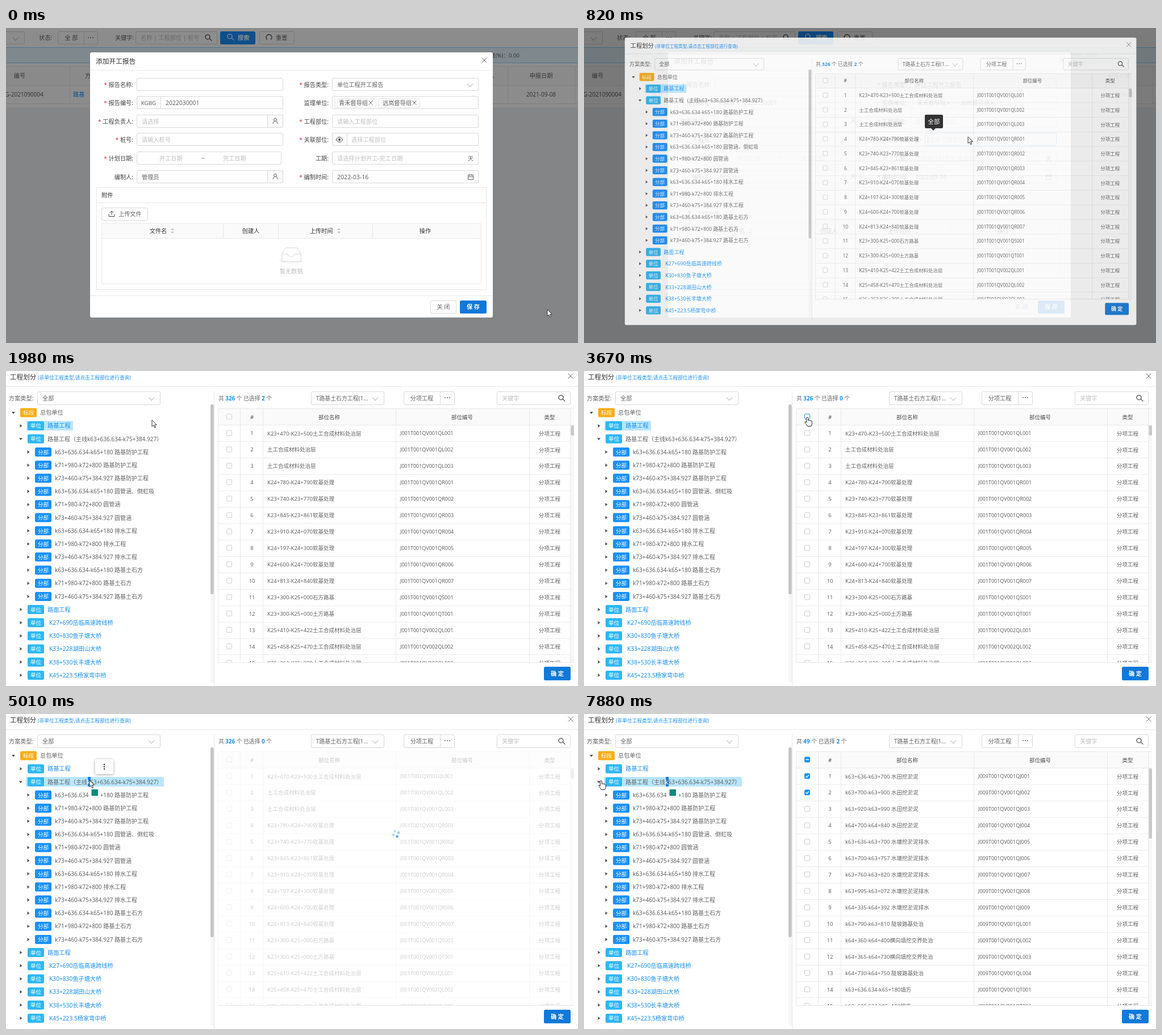
An HTML page that plays this animation: 1007 by 556 pixels, repeating every 8000 ms.

```html
<!DOCTYPE html>
<html lang="zh-CN">
<head>
<meta charset="utf-8">
<title>开工报告</title>
<style>
html, body { margin: 0; width: 100%; height: 100%; overflow: hidden; background: #fff; }
svg { display: block; width: 100vw; height: 100vh; font-family: "Noto Sans", "Noto Sans CJK SC", "Noto Sans CJK", sans-serif; }
text { white-space: pre; }
</style>
</head>
<body>
<svg id="stage" viewBox="0 0 1007 556"></svg>
<script>
const LOOP = 8000, TICK = 168, LEAD = 36;
const BLUE = '#1079d9', LINK = '#1890ff', INK = '#636363', HINT = '#bfbfbf', EDGE = '#d9d9d9', RULE = '#e8e8e8';
const stage = document.getElementById('stage');

// ---- drawing helpers: y of a text is its vertical middle ----
const text = (x, y, s, fill = INK, size = 10.2, anchor = 'start', weight = 400) =>
  `<text x="${x}" y="${y + size * .37}" fill="${fill}" font-size="${size}" text-anchor="${anchor}" font-weight="${weight}">${s}</text>`;
const mid = (x, y, s, fill, size, weight) => text(x, y, s, fill, size, 'middle', weight);
const rect = (x1, y1, x2, y2, fill = '#fff', stroke = 'none', r = 0) => {
  const o = stroke === 'none' ? 0 : .5;
  return `<rect x="${x1 + o}" y="${y1 + o}" width="${x2 - x1 - 2 * o}" height="${y2 - y1 - 2 * o}" rx="${r}" fill="${fill}" stroke="${stroke}"/>`;
};
const box = (x1, y1, x2, y2, fill) => rect(x1, y1, x2, y2, fill, EDGE, 2.5);
const path = (d, stroke = '#666', w = 1, fill = 'none') =>
  `<path d="${d}" fill="${fill}" stroke="${stroke}" stroke-width="${w}"/>`;
const hline = (x1, x2, y, c = RULE) => path(`M${x1} ${y + .5}H${x2}`, c);
const vline = (x, y1, y2, c = RULE) => path(`M${x + .5} ${y1}V${y2}`, c);
const dot = (x, y, r, fill, o = 1) => `<circle cx="${x}" cy="${y}" r="${r}" fill="${fill}" opacity="${o}"/>`;
const dots = (x, y) => [-4, 0, 4].map(d => dot(x + d, y, .9, INK)).join('');
const chevron = (x, y) => path(`M${x - 5} ${y - 2.5}l5 5.5 5-5.5`, '#aaa');
const cross = (x, y, r, c = '#777') => path(`M${x - r} ${y - r}l${2 * r} ${2 * r}m0 ${-2 * r}l${-2 * r} ${2 * r}`, c);
const lens = (x, y, c = '#444') => path(`M${x + 2.4} ${y + 1.6}l4 4M${x - 5} ${y - 1.2}a4 4 0 1 0 8 0a4 4 0 1 0-8 0`, c, 1.3);
const user = (x, y) => path(`M${x - 2.5} ${y - 2}a2.5 2.5 0 1 0 5 0a2.5 2.5 0 1 0-5 0M${x - 4} ${y + 5}q0-4.5 4-4.5t4 4.5`);
const group = (s, attrs = '') => `<g ${attrs}>${s}</g>`;
const button = (x1, y1, x2, y2, s) =>
  rect(x1, y1, x2, y2, BLUE, 'none', 2.5) + mid((x1 + x2) / 2, (y1 + y2) / 2, s, '#fff', 10.2, 600);

// ---- page behind the dialogs ----
function page() {
  return rect(0, 0, 1007, 556, '#f0f2f5') + rect(0, 0, 1007, 140) +
    box(-30, 6, 33, 29) + chevron(17, 19) + text(58, 17, '状态:') +
    box(91, 6, 162, 29) + vline(137, 6, 29, EDGE) + mid(115, 17, '全 部') + dots(149, 17) +
    text(192, 17, '关键字:') + box(228, 6, 372, 29) + text(237, 17, '名称 | 工程部位 | 桩号', HINT) + lens(356, 17) +
    rect(377, 6, 439, 29, LINK, 'none', 2.5) + lens(395, 16, '#fff') + text(408, 17, '搜索', '#fff', 10.2, 'start', 600) +
    box(446, 6, 508, 29) + path('M460 20.5a5 5 0 1 1 6 0', '#444', 1.3) + text(475, 17, '重置') +
    rect(-2, 34, 1009, 62, '#e6f7ff', '#91d5ff') + text(904, 48, '完成进度(%)：0.00', INK, 9.6, 'end') +
    rect(0, 67, 1007, 101, '#fafafa') + [67, 101, 133].map(y => hline(0, 1007, y)).join('') +
    [112, 883, 1001].map(x => vline(x, 67, 134)).join('') +
    mid(24, 84, '编号') + text(139, 84, '方案') + text(860, 84, '申报人', INK, 10.2, 'end') + mid(942, 84, '申报日期') +
    text(66, 117, 'KGBG-2021090004', INK, 10, 'end') + text(118, 117, '路基', LINK) + mid(942, 117, '2021-09-08', INK, 10) +
    rect(0, 0, 1007, 556, 'rgba(0,0,0,.45)');
}

// ---- report form ----
const ROWS = [100, 132, 165, 197, 230, 263];
const LABELS = [['*报告名称', '*报告编号', '*工程负责人', '*桩号', '*计划日期', '编制人'],
                ['*报告类型', '监理单位', '*工程部位', '*关联部位', '工期', '*编制时间']];
const tag = (x, s) => rect(x, 124, x + 74, 141, '#fafafa', RULE, 2) + text(x + 8, 132, s) + cross(x + 64, 132, 3.5);
const sorter = (x, y) => path(`M${x - 3} ${y - 1.5}l3-3 3 3zM${x - 3} ${y + 1.5}l3 3 3-3z`, 'none', 0, HINT);

function form(focus) {
  let s = rect(148, 43, 857, 511, '#fff', 'none', 3) + text(158, 59, '添加开工报告', '#333', 11.7) +
    cross(842, 57, 4.5) + hline(148, 857, 74);
  LABELS.forEach((names, col) => names.forEach((n, i) => {
    const y = ROWS[i], x = col ? 574 : 230;
    const mark = n[0] === '*' ? '<tspan fill="#d9363e">* </tspan>' : '';
    s += text(x - 6, y, mark + n.replace('*', '') + ':', '#444', 10.2, 'end') +
      box(x, y - 12, col ? 832 : i === 4 ? 485 : 488, y + 11);
  }));
  const [, b, c, d, e, f] = ROWS;
  s += text(583, 100, '单位工程开工报告') + chevron(817, 101) +
    box(230, b - 12, 273, b + 11, '#fafafa') + mid(251, b, 'KGBG', INK, 9.8) + text(281, b, '2022030001', INK, 10.4) +
    tag(578, '青禾督导组') + tag(655, '远岚督导组') +
    text(239, c, '请选择', HINT) + text(583, c, '请输入工程部位', HINT) +
    text(239, d, '请输入桩号', HINT) + box(574, d - 12, 601, d + 11, '#fafafa') +
    path(`M581 ${d}q6-9 12 0q-6 9-12 0`, '#444') + dot(587, d, 2, '#444') +
    text(608, d, '选择工程部位', HINT) +
    text(270, e, '开工日期', HINT) + mid(347, e, '~', '#888') + text(382, e, '完工日期', HINT) +
    text(583, e, '请选择计划开工-完工日期', HINT) + mid(818, e, '天') +
    text(239, f, '管理员') + text(583, f, '2022-03-16', INK, 10.6) +
    path(`M813.5 ${f - 3.5}h9v8h-9zM813.5 ${f - .5}h9M816 ${f - 5}v3M820 ${f - 5}v3`) +
    [c, f].map(y => box(460, y - 12, 488, y + 11, '#fafafa') + user(474, y - 1)).join('');
  if (focus) s += rect(600, d - 12, 832, d + 11, 'none', '#40a9ff', 2) + vline(605, d - 6, d + 6, '#444');
  s += rect(159, 281, 846, 462, '#fff', RULE) + hline(159, 846, 308) + text(168, 295, '附件', '#333') +
    box(168, 317, 250, 340) + path('M181 328.5v4h10v-4M186 330v-7m-3 3l3-3 3 3', '#444') + text(198, 328, '上传文件') +
    rect(168, 344, 837, 452, '#fff', RULE, 2) + rect(169, 345, 836, 372, '#fafafa') + hline(168, 836, 371) +
    [382, 479, 645].map(x => vline(x, 345, 372)).join('') +
    mid(268, 358, '文件名', '#333') + sorter(293, 358) + mid(431, 358, '创建人', '#333') +
    mid(555, 358, '上传时间', '#333') + sorter(586, 358) + mid(738, 358, '操作', '#333') +
    '<ellipse cx="502" cy="411" rx="21" ry="5" fill="#f5f5f5"/>' +
    path('M486 398l6-10h20l7 10v14h-33zM486 399h10q1 5 6 5t6-5h11', EDGE, 1, '#fff') +
    mid(502, 429, '暂无数据', HINT) + hline(148, 857, 472) +
    box(747, 481, 793, 504) + mid(770, 492, '关 闭') + button(799, 481, 846, 504, '保 存');
  return s;
}

// ---- tree ----
const SPANS = ['k63+636.634-k65+180', 'k71+980-k72+800', 'k73+460-k75+384.927'];
const PARTS = ['路基防护工程', '圆管涵', '排水工程', '路基土石方'];
const TREE = [[0, '总包单位', 1], [1, '路基工程'], [1, '', 1],
  ...PARTS.flatMap((p, i) => SPANS.map((r, j) => [2, r + ' ' + p + (i === 1 && !j ? '、倒虹吸' : '')])),
  [1, '路面工程'],
  ...['K27+690岳临高速跨线桥', 'K30+830鱼子塘大桥', 'K33+228湖田山大桥', 'K38+530长丰塘大桥', 'K45+223.5杨家弯中桥'].map(n => [1, n])];
const BADGES = [['标段', '#faad14'], ['单位', '#2db7f5'], ['分部', LINK]];

function tree(k) {
  let s = k < 27 ? rect(36, 88, 118, 105, '#bae7ff') : rect(35, 111, 278, 128, '#bae7ff');
  if (k >= 29) s += rect(144, 111, 149, 128, '#1a7ae0');
  TREE.forEach(([level, name, open], i) => {
    const y = 73.5 + 23.17 * i, x = 13 + 13 * level, [label, color] = BADGES[level];
    const main = i === 2;
    if (main) name = `路基工程（主线<tspan fill="${k >= 29 ? '#fff' : INK}">k</tspan>63+636.634-k75+384.927）`;
    s += path(open ? `M${x - 3} ${y - 1.5}h6l-3 4z` : `M${x - 1.5} ${y - 3}v6l4-3z`, 'none', 0, '#555') +
      rect(x + 12, y - 8, x + 41, y + 8, color, 'none', 2.5) + mid(x + 26.5, y, label, '#fff', 9.6) +
      text(x + (i > 15 ? 50 : 47), y, name, level === 1 && !main ? LINK : INK, level === 2 || main ? 10 : 10.2);
  });
  return s;
}

// ---- table ----
const SOIL = '土工合成材料处治层', SOFT = '软基处理', MUD = ' 水田挖淤泥', POND = ' 水塘挖淤泥排水';
const OLD = ['K23+470-K23+500' + SOIL, SOIL, SOIL,
  ...['K24+780-K24+790', 'K23+740-K23+770', 'K23+845-K23+861', 'K23+910-K24+070', 'K24+197-K24+300', 'K24+600-K24+700', 'K24+813-K24+840'].map(r => r + SOFT),
  'K23+300-K25+000石方路基', 'K23+300-K25+000土方路基',
  ...['K25+410-K25+422', 'K25+458-K25+470', 'K26+262-K26+300'].map(r => r + SOIL)];
const NEW = [...['k63+636-k63+700', 'k63+700-k63+900', 'k63+920-k63+990', 'k64+700-k64+840'].map(r => r + MUD),
  ...['k63+636-k63+700', 'k63+700-k63+757', 'k63+760-k63+820', 'k63+995-k63+072', 'k64+335-k64+392'].map(r => r + POND),
  'k63+790-k63+810 陡坡路基处治', 'k64+360-k64+400横向填挖交界处治', 'k64+365-k64+730横向填挖交界处治',
  'k64+730-k64+750 陡坡路基处治', 'k63+636.634-k65+180填方', 'k63+636.634-k65+180挖方'];
const series = (head, n) => Array.from({ length: n }, (_, i) => head + String(i + 1).padStart(3, '0'));
const A = 'J001T001QV001', B = 'J009T001QV001';
const OLD_CODES = [...series(A + 'QL', 3), ...series(A + 'QR', 7), A + 'QS001', A + 'QT001', ...series('J001T001QV002QL', 3)];
const NEW_CODES = [...series(B + 'QJ', 9), ...series(B + 'QL', 4), ...series(B + 'QT', 2)];

function check(y, state, hover) {
  const x = 393, on = state !== 'off';
  return rect(x - 5, y - 5, x + 5, y + 5, on ? LINK : '#fff', on || hover ? LINK : '#cfcfcf', 1.5) +
    (state === 'on' ? path(`M${x - 2.6} ${y}l2 2.2 3.4-4.3`, '#fff', 1.4) : '') +
    (state === 'some' ? path(`M${x - 2.8} ${y}h5.6`, '#fff', 1.5) : '');
}

function table(k) {
  const fresh = k >= 32, all = k >= 16 && k < 22;
  const picked = k >= 39 ? 2 : k >= 37 ? 1 : 0;
  const names = fresh ? NEW : OLD, codes = fresh ? NEW_CODES : OLD_CODES;
  const head = all ? 'on' : picked ? 'some' : 'off';
  let s = rect(374, 67, 1000, 96, '#fafafa') + hline(374, 1000, 66) + hline(374, 1000, 95) +
    check(80.5, head, k >= 14 && k < 24) +
    [[433, '#'], [569, '部位名称'], [803, '部位编号'], [957, '类型']].map(([x, t]) => mid(x, 81, t, '#4a4a4a', 9.5, 500)).join('');
  names.forEach((n, i) => {
    const y = 110 + 28.96 * i;
    s += check(y - .5, all || i < picked ? 'on' : 'off') + mid(433, y, i + 1, INK, 9.4) +
      text(460, y, n, INK, 9.5) + text(694, y, codes[i], INK, 9) + mid(957, y, '分项工程', INK, 9.6) +
      hline(374, 993, Math.round(y + 14), '#ededed');
  });
  s += [373, 412, 452, 686, 921, 993].map(x => vline(x, 67, 515)).join('') +
    rect(994, 96, 1000, 515, '#f7f7f7') + rect(994.5, 96, 1000, fresh ? 220 : 114, '#c8c8c8', 'none', 2.5);
  const fade = k === 28 ? .6 : k > 28 && k < 32 ? .3 : 1;
  return group(s, `clip-path="url(#grid)" opacity="${fade}"`) + hline(374, 1000, 514) + (fade < 1 ? spinner(k) : '');
}

function spinner(k) {
  return [1, .45, .35, .6].map((o, i) => {
    const a = (65 + (k - 30) * 50 + i * 90) * Math.PI / 180;
    return dot(686.5 + 5 * Math.cos(a), 211.5 + 5 * Math.sin(a), 2.4, LINK, o * .75);
  }).join('');
}

// ---- part picker ----
function picker(k) {
  const num = n => `<tspan fill="${LINK}" font-weight="600">${n}</tspan>`;
  const total = k >= 32 ? 49 : 326;
  const chosen = k < 16 ? 2 : k < 22 ? 326 : k < 37 ? 0 : k < 39 ? 1 : 2;
  let s = rect(-4, -4.6, 1009, 566, '#fff', 'none', 3) + text(7, 11, '工程划分', '#333', 11.6) +
    text(56, 12, '(非单位工程类型,请点击工程部位进行查询)', LINK, 8.7) + cross(994, 9, 4.5) + hline(-4, 1009, 27) +
    text(5, 48, '方案类型:', INK, 10.2) + box(55, 36, 272, 60) + text(64, 48, '全部') + chevron(256, 49) +
    rect(360, 58, 366, 550, '#f7f7f7') + rect(360, 59, 365.5, 394, '#c4c4c4', 'none', 2.5) + vline(366, 36, 556) +
    tree(k) +
    text(374, 48, `共 ${num(total)} 个 已选择 ${num(chosen)} 个`, INK, 9.8) +
    box(537, 36, 666, 60) + text(546, 48, 'T路基土石方工程(1...', INK, 9.9) + chevron(650, 49) +
    box(700, 36, 790, 60) + vline(764, 36, 60, EDGE) + mid(732, 48, '分项工程') + dots(777, 47) +
    box(864, 36, 994, 60) + text(873, 48, '关键字', HINT) + lens(978, 48) +
    table(k) + button(947, 522, 994, 546, '确 定');
  if (k >= 29) s += rect(145, 131, 167, 148) + rect(150.5, 133, 162, 144.5, '#12897b', 'none', 1);
  if (k >= 29 && k < 32) {
    s += group(rect(157, 80, 189, 106, '#fff', 'none', 2), 'filter="url(#shadow)"') +
      [-4, 0, 4].map(d => dot(173, 93 + d, 1.2, '#333')).join('');
  }
  return s;
}

// ---- pointer: [tick, x, y] ----
const TRACK = [[0, 953, 497], [3, 705, 218], [4, 676, 192], [5, 676, 192], [6, 510, 194], [7, 478, 122], [10, 121, 92],
  [14, 393, 81], [22, 393, 81], [26, 147, 117], [31, 147, 117], [34, 394, 112], [36, 394, 112], [38, 394, 147],
  [41, 394, 147], [45, 110, 72], [47, 30, 117]];

function pointer(k) {
  const i = Math.max(1, TRACK.findIndex(p => p[0] >= k));
  const [k0, x0, y0] = TRACK[i - 1], [k1, x1, y1] = TRACK[i], u = (k - k0) / (k1 - k0);
  const x = x0 + (x1 - x0) * u, y = y0 + (y1 - y0) * u;
  const hand = (k >= 14 && k < 24) || k === 47;
  const shape = hand
    ? path('M-1.5 1.5q1.5-2 3 0v5q1-1 2.3 0q1.2-.8 2.3.4q2-.3 2.2 1.6v3.5q0 2-1.5 4.5h-6.5q-1-2.5-4-6q-1-2 1-1.8l1.2 1.3z', '#222', 1, '#fff')
    : path('M0 0v11.5l2.7-2.4 2 4.5 1.9-.9-2-4.3h3.7z', '#222', .9, '#fff');
  const press = k === 15 || k === 36 || k === 38;
  return (press ? dot(x, y, 9, '#f3ee2e', .8) : '') + group(shape, `transform="translate(${x} ${y})"`);
}

const tooltip = () => rect(600, 153, 632, 177, '#333', 'none', 2.5) +
  path('M611 177h8l-4 4z', 'none', 0, '#333') + mid(616, 165, '全部', '#fff', 10.4);

const DEFS = `<defs><clipPath id="grid"><rect x="373" y="66" width="628" height="449"/></clipPath>
  <filter id="shadow" x="-50%" y="-50%" width="200%" height="200%"><feDropShadow dx="0" dy="1" stdDeviation="2.5" flood-opacity=".35"/></filter></defs>`;

// The picker zooms in: scale, offset and opacity on its first two ticks.
const ZOOM = { 5: [.889, 75.4, 21.1, .86], 6: [.9975, 1.7, .6, 1] };

function scene(k) {
  let s = DEFS;
  if (k < 7) s += page() + form(k === 4 || k === 5);
  if (k === 5) s += rect(0, 0, 1007, 556, 'rgba(0,0,0,.12)');
  if (k >= 5) {
    const [scale, x, y, alpha] = ZOOM[k] || [1, 0, 0, 1];
    s += group(picker(k), `transform="translate(${x} ${y}) scale(${scale})" opacity="${alpha}"`);
  }
  if (k === 4 || k === 5) s += tooltip();
  return s + pointer(k);
}

// The screen refreshes in steps, about six per second.
let shown = -1;
function draw(now) {
  const k = Math.floor((now % LOOP + LEAD) / TICK);
  if (k !== shown) stage.innerHTML = scene(shown = k);
}
const start = performance.now();
function loop() {
  draw(performance.now() - start);
  requestAnimationFrame(loop);
}
loop();
</script>
</body>
</html>
```
